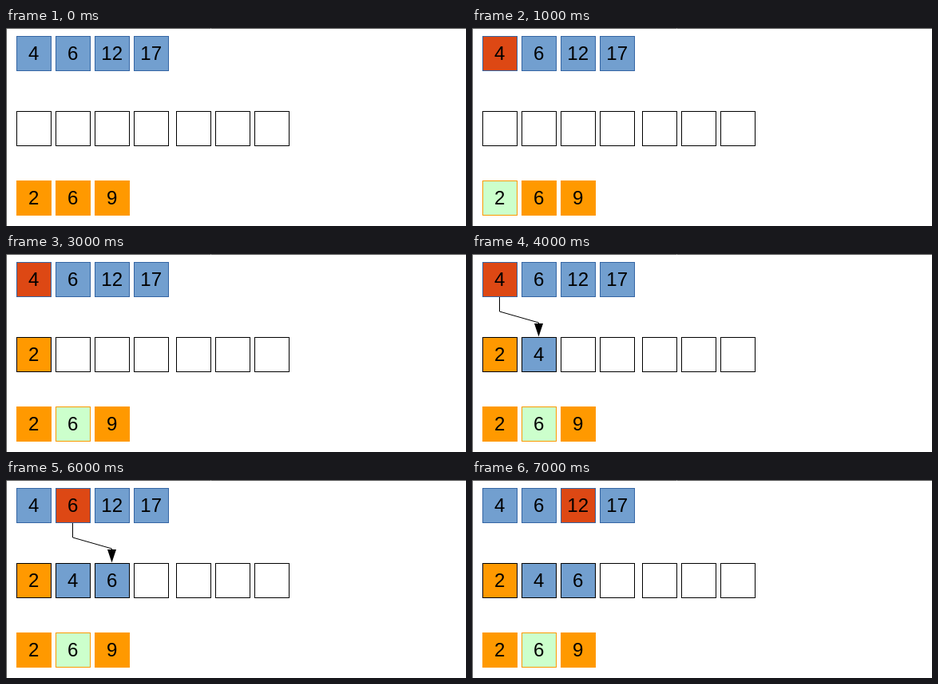
Write an HTML page that moves like this. It is 576 px wide and 248 px high and loops after 8000 ms.

```html
<!DOCTYPE html>
<html lang="en">
<head>
<meta charset="utf-8">
<title>Merging two sorted lists</title>
<style>
html, body { margin: 0; width: 100%; height: 100%; overflow: hidden; background: #fff; }
svg { display: block; width: 576px; height: 248px; }
text { font: 24px "Liberation Sans", Arial, sans-serif; text-anchor: middle; }
</style>
</head>
<body>
<svg id="stage" viewBox="0 0 576 248"></svg>
<script>
const BLUE = '#729fcf', NAVY = '#3465a4', ORANGE = '#ff9900';
const RED = '#dd4814', GREEN = '#ccffcc', BLACK = '#000';
const upper = [4, 6, 12, 17], lower = [2, 6, 9];
const STEP = 1000, STEPS = 8;
const stage = document.getElementById('stage');

const cellX = i => 13 + 49 * i;
const slotX = i => cellX(i) + (i > 3 ? 4 : 0);

function cell(x, y, fill, stroke, label = '') {
  return `<rect x="${x + .5}" y="${y + .5}" width="43" height="43" fill="${fill}" stroke="${stroke}"/>` +
    `<text x="${x + 21.7}" y="${y + 30}">${label}</text>`;
}

function arrow(path, x, tip, base) {
  return `<path d="${path}" fill="none" stroke="#000"/>` +
    `<path d="M${x} ${tip}L${x - 5.5} ${base}H${x + 5.5}Z"/>`;
}

const upArrow = i => {
  const x = cellX(i) + 21.5;
  return arrow(`M${x} 191V160`, x, 148, 164);
};

const downArrow = (from, to) => {
  const a = cellX(from) + 21.5, b = slotX(to) + 21.5;
  return arrow(`M${a} 54V72L${b} 86V92`, b, 103.5, 87);
};

// Step 0 shows the lists; then steps alternate between comparing and copying.
function picture(step) {
  const copied = step >> 1, copying = step > 0 && step % 2 === 0;
  const out = [];
  let i = 0, j = 0, link = '';
  for (let k = 0; k < copied; k++) {
    const last = copying && k === copied - 1;
    const fromUpper = upper[i] <= lower[j];
    out.push(fromUpper ? [upper[i], BLUE] : [lower[j], ORANGE]);
    if (last) link = fromUpper ? downArrow(i, k) : upArrow(j);
    else if (fromUpper) i++;
    else j++;
  }
  let s = '<path d="M0 .5H576M.5 0V248" stroke="#555"/>';
  upper.forEach((n, k) => {
    s += cell(cellX(k), 10, step && k === i ? RED : BLUE, NAVY, n);
  });
  for (let k = 0; k < 7; k++) {
    const [n, fill] = out[k] || ['', '#fff'];
    s += cell(slotX(k), 104, fill, BLACK, n);
  }
  lower.forEach((n, k) => {
    s += cell(cellX(k), 191, step && k === j ? GREEN : ORANGE, ORANGE, n);
  });
  return s + link;
}

let shown = -1;
const start = performance.now();
function frame() {
  const step = Math.floor((performance.now() - start) / STEP) % STEPS;
  if (step !== shown) stage.innerHTML = picture(shown = step);
  requestAnimationFrame(frame);
}
frame();
</script>
</body>
</html>
```
